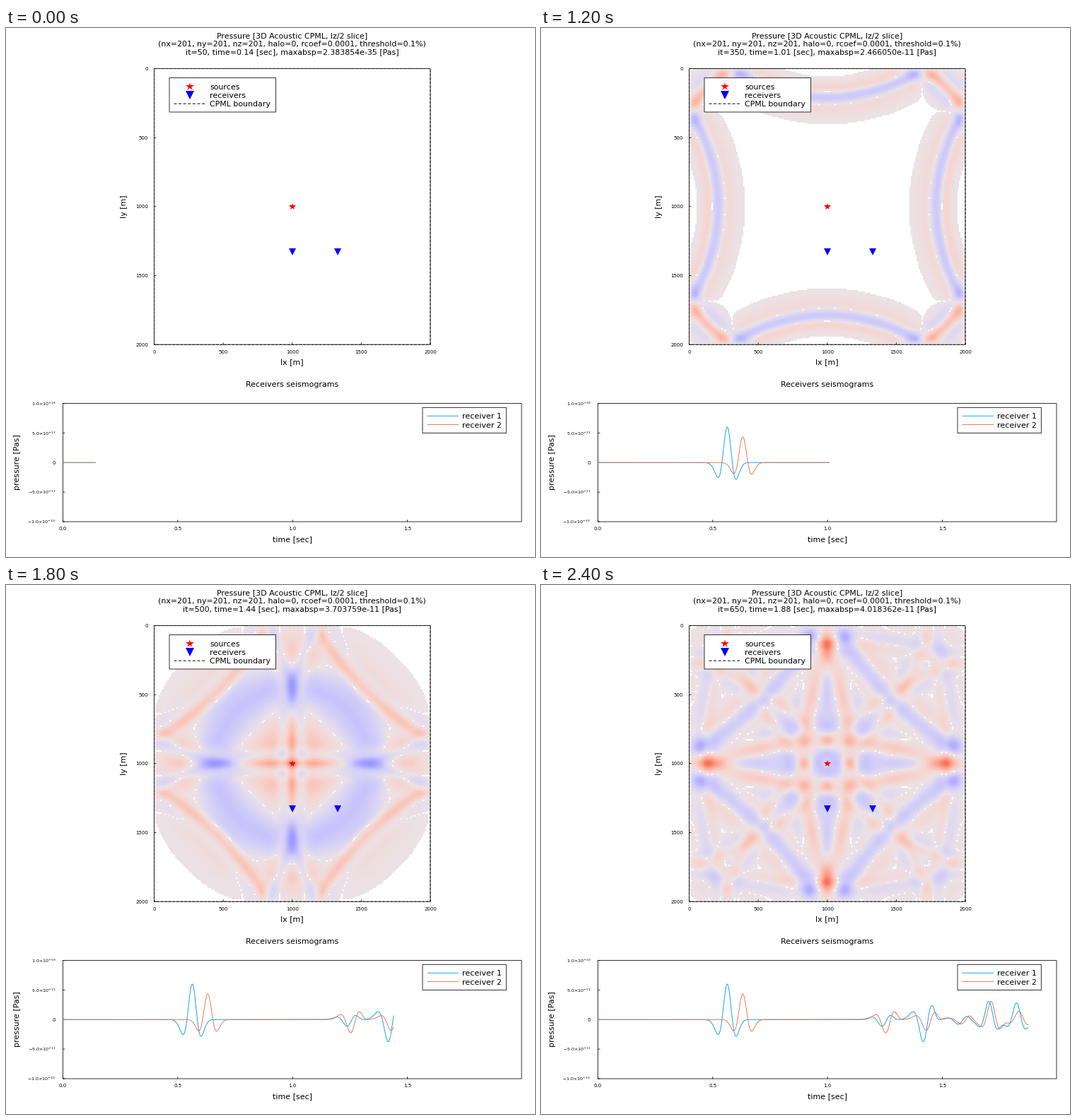
A matplotlib script for the animation above (2.6 s loop, 748x749 px).

```python
from itertools import permutations

import numpy as np
import matplotlib.pyplot as plt
from matplotlib.animation import FuncAnimation
from matplotlib.colors import LinearSegmentedColormap
from matplotlib.patches import Rectangle

W, H, DPI = 748, 749, 100
PT = 72 / DPI  # points per pixel
plt.rcParams.update({"font.family": "DejaVu Sans", "mathtext.fontset": "dejavusans"})

# Acoustic wave in a closed cube: second-order scheme at the stability limit
SPEED, DX, HALF = 2000.0, 10.0, 100
DT = DX / (SPEED * np.sqrt(3))
FREQ, DELAY = 10.0, 0.4
STEP, FRAMES = 50, 13
P_MAX, THRESHOLD = 1e-10, 1e-3
REC = 33  # receiver offset from the centre, in cells


def ricker(t):
    a = (np.pi * FREQ * (t - DELAY)) ** 2
    return (1 - 2 * a) * np.exp(-a)


def simulate():
    """Advance the even eigenmodes of the cube; return mid slices and traces."""
    theta = (2 * np.arange(HALF) + 1) * np.pi / (2 * HALF)
    i, j, k = np.indices((HALF,) * 3).reshape(3, -1)
    ordered = (i <= j) & (j <= k)
    i, j, k = i[ordered], j[ordered], k[ordered]
    copies = np.where(i == k, 1, np.where((i == j) | (j == k), 3, 6))
    norm = 1.0 / HALF**3

    c = np.cos(theta)
    gain = 2 * (c[i] + c[j] + c[k]) / 3
    r = np.cos(REC * theta)
    probe = np.array([r[i] + r[j] + r[k],
                      r[i] * r[j] + r[j] * r[k] + r[i] * r[k]]) * copies * norm / 3

    basis = np.cos(np.outer(theta, np.arange(1 - HALF, HALF)))
    cube = np.empty((HALF,) * 3)
    now, before = np.zeros(len(i)), np.zeros(len(i))
    slices, traces = [], []
    for n in range(STEP * FRAMES):
        new = gain * now
        new -= before
        new += ricker(n * DT) * DT**2 / DX**3
        before, now = now, new
        traces.append(probe @ now)
        if (n + 1) % STEP == 0:
            for index in permutations((i, j, k)):
                cube[index] = now
            slices.append(basis.T @ cube.sum(axis=2) @ basis * norm)
    return slices, np.array(traces).T


slices, traces = simulate()

fig = plt.figure(figsize=(W / DPI, H / DPI), dpi=DPI, facecolor="white")
ax = fig.add_axes([0, 0, 1, 1])
ax.set_xlim(0, W)
ax.set_ylim(H, 0)
ax.axis("off")

# Panel edges in pixels
L, R, T, B = 209.5, 600.0, 57.5, 448.2
SL, SR, ST, SB = 80.5, 729.0, 531.5, 699.0
T_END = 692 * DT


def map_x(m):
    return L + (R - L) * m / 2000


def map_y(m):
    return T + (B - T) * m / 2000


def time_x(t):
    return SL + (SR - SL) * t / T_END


def press_y(p):
    return (ST + SB) / 2 - (SB - ST) / 2 * p / P_MAX


def text(x, y, s, size=11.0, ha="center", rotation=0, z=6):
    """Text whose capitals are centred on (x, y)."""
    shift = 0.365 * size
    dx, dy = (shift, 0) if rotation else (0, shift)
    return ax.text(x + dx, y + dy, s, fontsize=size * PT, ha=ha, va="baseline",
                   rotation=rotation, rotation_mode="anchor", zorder=z)


def line(xs, ys, color="black", width=0.8, z=3, **kw):
    return ax.plot(xs, ys, color=color, lw=width * PT, zorder=z, snap=False, **kw)[0]


def box(x0, y0, x1, y1, fill="none", z=3):
    ax.add_patch(Rectangle((x0, y0), x1 - x0, y1 - y0, fc=fill, ec="black",
                           lw=0.8 * PT, zorder=z, snap=False))


def mark(x, y, shape, color, size, z=4):
    ax.plot([x], [y], marker=shape, color=color, ms=size * PT, mew=0, ls="none", zorder=z)


# Pressure map
stops = [(-1, (20, 30, 130)), (-0.5, (122, 114, 250)), (-0.37, (155, 149, 255)),
         (-0.175, (203, 199, 251)), (-0.1, (217, 212, 245)), (0, (236, 226, 230)),
         (0.1, (246, 212, 207)), (0.2, (252, 188, 172)), (0.315, (254, 150, 129)),
         (0.4, (244, 114, 91)), (0.5, (230, 85, 62)), (1, (130, 10, 10))]
cmap = LinearSegmentedColormap.from_list(
    "blue_red", [((v + 1) / 2, np.array(rgb) / 255) for v, rgb in stops])
cmap.set_bad("white")
edge = DX / 2
heat = ax.imshow(np.zeros((2 * HALF - 1,) * 2), cmap=cmap, vmin=-P_MAX, vmax=P_MAX,
                 extent=(map_x(edge), map_x(2000 - edge), map_y(2000 - edge), map_y(edge)),
                 interpolation="nearest", aspect="auto", zorder=1)

box(L, T, R, B)
line([L, R, R, L, L], [T, T, B, B, T], dashes=(4, 3))
TICK = 2.5
for m in range(0, 2001, 500):
    x, y = map_x(m), map_y(m)
    line([x, x], [B, B - TICK])
    line([L, L + TICK], [y, y])
    text(x, 458, str(m), 7)
    text(201.3, y, str(m), 7, ha="right")
text(404.8, 472.5, "lx [m]")
text(166, 253, "ly [m]", rotation=90)

mark(map_x(1000), map_y(1000), "*", "red", 11)
for m in (1000, 1000 + REC * DX):
    mark(map_x(m), map_y(1000 + REC * DX), "v", "blue", 10.5)

box(231, 70.5, 381.5, 119, "white", 5)
mark(260, 82.8, "*", "red", 13, 6)
mark(260, 95, "v", "blue", 12.5, 6)
line([237.5, 283], [107.2, 107.2], z=6, width=1, dashes=(4, 2.6))
for row, label in enumerate(("sources", "receivers", "CPML boundary")):
    text(288, 82.8 + 12.2 * row, label, ha="left")

text(404.8, 9.8, "Pressure [3D Acoustic CPML, lz/2 slice]")
text(404.8, 22, "(nx=201, ny=201, nz=201, halo=0, rcoef=0.0001, threshold=0.1%)")
status = text(404.8, 34.2, "")

# Seismograms
text(404.8, 504, "Receivers seismograms")
box(SL, ST, SR, SB)
for t in (0.0, 0.5, 1.0, 1.5):
    line([time_x(t)] * 2, [SB, SB - TICK])
    text(time_x(t), 708.5, f"{t:.1f}", 7)
for p, label in ((1, r"$1.0{\times}10^{-10}$"), (0.5, r"$5.0{\times}10^{-11}$"), (0, "0"),
                 (-0.5, r"$-5.0{\times}10^{-11}$"), (-1, r"$-1.0{\times}10^{-10}$")):
    y = press_y(p * P_MAX)
    line([SL, SL + TICK], [y, y])
    text(70.5, y + (0.6 if p else 0), label, 6.4 if p else 7, ha="right")
text(404.8, 723, "time [sec]")
text(15, 615, "pressure [Pas]", rotation=90)

COLORS = ("#009afa", "#e36f47")
curves = [line([], [], color, 0.9, 4) for color in COLORS]
box(589, 537.3, 707.3, 573.6, "white", 5)
for row, color in enumerate(COLORS):
    y = 549.3 + 12.2 * row
    line([596, 639.5], [y, y], color, 0.9, 6)
    text(645.5, y, f"receiver {row + 1}", ha="left")


def update(frame):
    it = STEP * (frame + 1)
    p = slices[frame]
    heat.set_data(np.ma.masked_where(np.abs(p) < THRESHOLD * P_MAX, p))
    status.set_text(f"it={it}, time={it * DT:.2f} [sec], "
                    f"maxabsp={np.abs(p).max():.6e} [Pas]")
    times = time_x(np.arange(it) * DT)
    for curve, trace in zip(curves, traces):
        curve.set_data(times, press_y(trace[:it]))
    return [heat, status, *curves]


anim = FuncAnimation(fig, update, frames=FRAMES, interval=200, repeat=True, repeat_delay=0)
plt.show()
```
